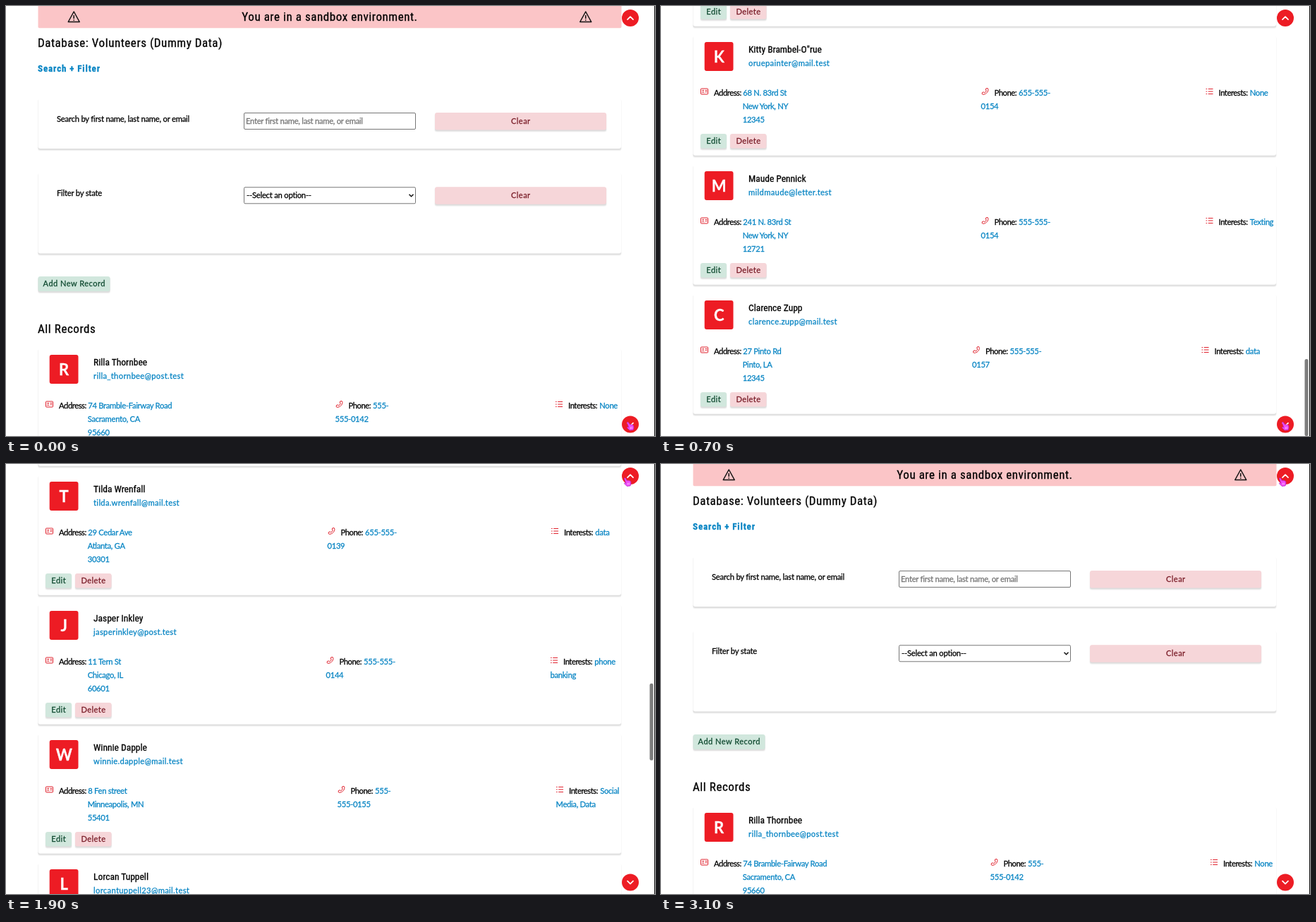
An HTML page for the animation above (3500 ms loop, 920 by 609 pixels).

```html
<!DOCTYPE html>
<html lang="en">
<head>
<meta charset="utf-8">
<title>Volunteer database</title>
<style>
  html, body { margin: 0; width: 100%; height: 100%; overflow: hidden; background: #fff; }
  svg { display: block; width: 920px; height: 609px; }
  text {
    --ink: #000;
    font: 11.2px Lato, sans-serif; letter-spacing: -.3px; white-space: pre;
    fill: var(--ink); stroke: var(--ink); stroke-width: .28px;
  }
  .head, .name, .sub { font-family: "Roboto Condensed", Roboto, sans-serif; font-stretch: 75%; }
  .head { font-size: 17px; letter-spacing: .57px; }
  .name { font-size: 13.5px; letter-spacing: 0; }
  .sub { --ink: #0784c3; font-size: 13px; font-weight: 700; letter-spacing: .9px; }
  .wide .head { font-size: 16px; letter-spacing: .1px; }
  .wide .name { font-size: 12.2px; }
  .wide .sub { letter-spacing: .2px; }
  .label { letter-spacing: -.42px; }
  .form { letter-spacing: -.2px; }
  .hint { --ink: #757575; letter-spacing: -.25px; }
  .link { --ink: #0784c3; }
  .mail { --ink: #0784c3; letter-spacing: .34px; }
  .btn { font-size: 11px; letter-spacing: .5px; }
  .green { --ink: #0f4a30; }
  .maroon { --ink: #7a1d28; }
  .letter { --ink: #fff; font-size: 22px; font-weight: 700; letter-spacing: 0; }
  .mid { text-anchor: middle; }
  .icon { fill: none; stroke: #e0202c; stroke-width: 1; }
</style>
</head>
<body>
<svg id="stage" viewBox="0 0 920 609">
  <defs>
    <g id="card" class="icon">
      <rect x=".5" y=".5" width="10" height="8" rx=".8"/>
      <circle cx="3.6" cy="3.3" r=".8"/>
      <path d="M2 6.6q1.6-2.2 3.2 0M6.6 3h2.6M6.6 5.2h2.6"/>
    </g>
    <path id="phone" class="icon" d="M6.2 .9L8.6 .5L9.4 2.4C9 6.4 6 9 2.2 9.4L.6 8.6L.9 6.5L3 5.8L4 6.9Q6 6 6.8 4L5.8 3Z"/>
    <path id="list" class="icon" d="M0 1h1.6M0 4.5h1.6M0 8h1.6M3.2 1h6.8M3.2 4.5h6.8M3.2 8h6.8"/>
    <g id="warn" fill="none" stroke="#111" stroke-width="1.5" stroke-linejoin="round">
      <path d="M0-7.5L8 7H-8Z"/>
      <path d="M0-2.5V2.4M0 3.8V5.3"/>
    </g>
  </defs>
  <g id="page"></g>
  <rect id="thumb" x="912.5" width="5" height="109" rx="2.5" fill="#7d7d7d"/>
  <rect x="919" width="1" height="609" fill="#111"/>
  <g fill="none" stroke="#fff" stroke-width="1.7" stroke-linecap="round" stroke-linejoin="round">
    <circle cx="885" cy="17" r="12" fill="#ed1c24" stroke="none"/>
    <path d="M881 19.2l4-4l4 4"/>
    <circle cx="885" cy="592.5" r="12" fill="#ed1c24" stroke="none"/>
    <path d="M881 590.6l4 4l4-4"/>
  </g>
  <g id="hand">
    <path d="M-4.6-5.2Q-3.4-6.4-2.4-5L-.6-1.8L.6-2.6L1.6-1.8L2.8-2.2L3.6-1.2L4.6-1L5 2.6L4 5.4L-.8 6L-4.4 2.4Q-4.8 1.2-3.4 1.2L-2.2 1.8Z"
      fill="#f04bf6" stroke="#b322c4" stroke-width=".7" stroke-linejoin="round"/>
    <path d="M.4 1.4V4M2.2 1.2V3.8" stroke="#ffd8ff" stroke-width=".7"/>
  </g>
</svg>
<script>
const $ = id => document.getElementById(id);
const page = $('page'), thumb = $('thumb'), hand = $('hand');
const BOTTOM = 2822, PITCH = 183, FIRST = 494;

// name | mail | street | city | zip | phone | phone 2 | phone x | interests x | interests by line
const ROWS = `Rilla Thornbee|rilla_thornbee@post.test|74 Bramble-Fairway Road|Sacramento, CA|95660|555-|555-0142|467.5|779|None
Rufus Oakdell|rufus.oakdell@mail.test|36 3rd Ave|Baltimore, MD|21298|555-555-|0142|459.5|774.5||Leadership, phone|banking
Silvan Thrupp|Silvan@meadowvote9x42.test|18 Fern St|Pittsburgh, PA|15201|555-555-|0119|459.5|774.5|data
Hattie Mossop|hattie.mossop@mail.test|62 Birch St|Austin, TX|78701|555-555-|0123|456.5|773|None
Delmar Quill|delmarquill@mail.test|7 Heron Ave|Denver, CO|80202|655-555-|0128|454.5|772|Texting
Oona Pellworth|oona.pellworth@post.test|45 Larch Road|Portland, OR|97201|555-|555-0133|467.5|779||Leadership
Barnaby Frood|barnabyfrood@mail.test|31 Plover St|Columbus, OH|43004|555-555-|0136|454.5|772|None
Tilda Wrenfall|tilda.wrenfall@mail.test|29 Cedar Ave|Atlanta, GA|30301|655-555-|0139|456.5|773|data
Jasper Inkley|jasperinkley@post.test|11 Tern St|Chicago, IL|60601|555-555-|0144|454.5|772|phone|banking
Winnie Dapple|winnie.dapple@mail.test|8 Fen street|Minneapolis, MN|55401|555-|555-0155|470.5|780|Social|Media, Data
Lorcan Tuppell|lorcantuppell23@mail.test|37 N. 83rd St|Brooklyn, NY|12345|655-555-|0152|452.5|771|None
Geraldine Froskel|geraldine.froskel@mail.test|52 Moss St|Beverly Hills, CA|90210|555-|555-0151|467.5|779||Campaign Liason
Milo Fernhart|milofernhart@mail.test|5 N. 83rd St|New York, NY|12345|655-555-|0153|454.5|772|phone|banking
Kitty Brambel-O"rue|oruepainter@mail.test|68 N. 83rd St|New York, NY|12345|655-555-|0154|454.5|772.5|None
Maude Pennick|mildmaude@letter.test|241 N. 83rd St|New York, NY|12721|555-555-|0154|454.5|772.5|Texting
Clarence Zupp|clarence.zupp@mail.test|27 Pinto Rd|Pinto, LA|12345|555-555-|0157|442|766.5|data`
  .split('\n').map(r => r.split('|'));

const text = (x, y, s, cls = '') => `<text x="${x}" y="${y}" class="${cls}">${s || ''}</text>`;
const rect = (x, y, w, h, fill, more = '') =>
  `<rect x="${x}" y="${y}" width="${w}" height="${h}" fill="${fill}" ${more}/>`;
const icon = (id, x, y) => `<use href="#${id}" x="${x}" y="${y}"/>`;

function raised(x, y, w, h, fill) {
  return rect(x - .5, y + 1, w + 1, h + 2, '#000', 'rx="3" opacity=".06"') +
    rect(x, y + 1, w, h + .8, '#000', 'rx="3" opacity=".08"') +
    rect(x, y, w, h, fill, 'rx="3"');
}

function button(x, y, w, h, label, tone) {
  const fill = tone === 'green' ? '#d1e7dd' : '#f6d6d9';
  return raised(x, y, w, h, fill) +
    text(x + w / 2 + .25, y + h / 2 + 3.6, label, 'btn mid ' + tone);
}

function record(row, i) {
  const [name, mail, street, city, zip, tel, tel2] = row;
  const px = +row[7], ix = +row[8], [a, b, c] = row.slice(9);
  const y = FIRST + i * PITCH, line = n => y + 75.5 + 19 * n;
  return raised(45.5, y - 9, 826.5, 169.7, '#fff') +
    rect(61.7, y, 40.8, 41, '#ed1c24', 'rx="3"') +
    text(82.2, y + 28.5, name[0], 'letter mid') +
    text(124, y + 14.5, name, 'name') +
    text(124, y + 34, mail, 'mail') +
    icon('card', 56, y + 65.5) + text(75, line(0), 'Address:', 'label') +
    text(116.3, line(0), street, 'link') +
    text(115.7, line(1), city, 'link') +
    text(115.7, line(2), zip, 'link') +
    icon('phone', px, y + 65) + text(px + 18, line(0), 'Phone:', 'label') +
    text(px + 52.5, line(0), tel, 'link') +
    text(px - 1, line(1), tel2, 'link') +
    icon('list', ix, y + 65.5) + text(ix + 18, line(0), 'Interests:', 'label') +
    text(ix + 62.3, line(0), a, 'link') +
    text(ix - .5, line(1), b, 'link') +
    text(ix - .5, line(2), c, 'link') +
    button(56, y + 130, 37, 20.5, 'Edit', 'green') +
    button(98, y + 130, 51.5, 20.5, 'Delete', 'maroon');
}

const field = y => rect(337.5, y, 243, 23, '#fff', 'rx="1.5" stroke="#767676"');

function build() {
  page.innerHTML =
    rect(45.5, -4, 827, 35.3, '#fbc5c7', 'rx="2"') +
    icon('warn', 96.2, 15.5) + icon('warn', 821.7, 15.5) +
    text(459, 20.5, 'You are in a sandbox environment.', 'head mid') +
    text(45, 58.3, 'Database: Volunteers (Dummy Data)', 'head') +
    text(45, 93, 'Search + Filter', 'sub') +
    raised(45.5, 131, 826.5, 71, '#fff') +
    text(72, 164, 'Search by first name, last name, or email', 'form') +
    field(151.5) + text(340, 167, 'Enter first name, last name, or email', 'hint') +
    button(608, 151, 243, 24.5, 'Clear', 'maroon') +
    raised(45.5, 236, 826.5, 114.5, '#fff') +
    text(72, 269.3, 'Filter by state', 'form') +
    field(256.8) + text(341, 272, '--Select an option--', 'form') +
    '<path d="M571.5 266.8l3 3l3-3" fill="none" stroke="#111" stroke-width="1.5"/>' +
    button(608, 256.3, 243, 24.5, 'Clear', 'maroon') +
    button(45.5, 383, 102, 21, 'Add New Record', 'green') +
    text(45, 463, 'All Records', 'head') +
    ROWS.map(record).join('');
}

// Use tighter spacing where no condensed face is at hand
function fitFace() {
  const pen = document.createElement('canvas').getContext('2d');
  const width = face => {
    pen.font = `40px ${face}, sans-serif`;
    return pen.measureText('sandbox environment').width;
  };
  if (width('"Roboto Condensed", Roboto') > .96 * width('Roboto')) {
    const probe = document.createElementNS('http://www.w3.org/2000/svg', 'text');
    probe.setAttribute('class', 'head');
    probe.style.cssText = 'font-size:40px;letter-spacing:0';
    probe.textContent = 'sandbox environment';
    page.append(probe);
    const narrow = probe.getComputedTextLength() < .96 * width('Roboto');
    probe.remove();
    if (!narrow) $('stage').classList.add('wide');
  }
}

const LOOP = 3500, STEP = 100;
const DOWN = [0, 150, 540, 1080, 1660, 2189, 2610];
const UP = [1750, 850, 306, 60, 8];
const ease = u => u * u * (3 - 2 * u);

function scrollAt(i) {
  if (i < 7) return DOWN[Math.max(i, 0)];
  return i < 19 ? BOTTOM : UP[i - 19] || 0;
}

function thumbAlpha(i) {
  if (i === 13 || i === 24) return .5;
  return (i > 0 && i < 13) || (i > 18 && i < 24) ? 1 : 0;
}

function draw(t) {
  const i = Math.floor(t / STEP), y = scrollAt(i);
  page.setAttribute('transform', `translate(0 ${-y})`);
  // the thumb trails the page while it moves
  const lag = i < 7 ? .77 : i < 20 ? 0 : .17;
  const ty = y + lag * (scrollAt(i - 1) - y);
  thumb.setAttribute('y', 2 + ty / BOTTOM * 498);
  thumb.setAttribute('opacity', thumbAlpha(i));
  const k = ease(Math.min(1, Math.max(0, (i - 8) / 9)));
  hand.setAttribute('transform', `translate(${885 - 4 * k} ${595 - 569.5 * k})`);
}

fitFace();
build();
const start = performance.now();
function tick() {
  draw((performance.now() - start) % LOOP);
  requestAnimationFrame(tick);
}
tick();
</script>
</body>
</html>
```
